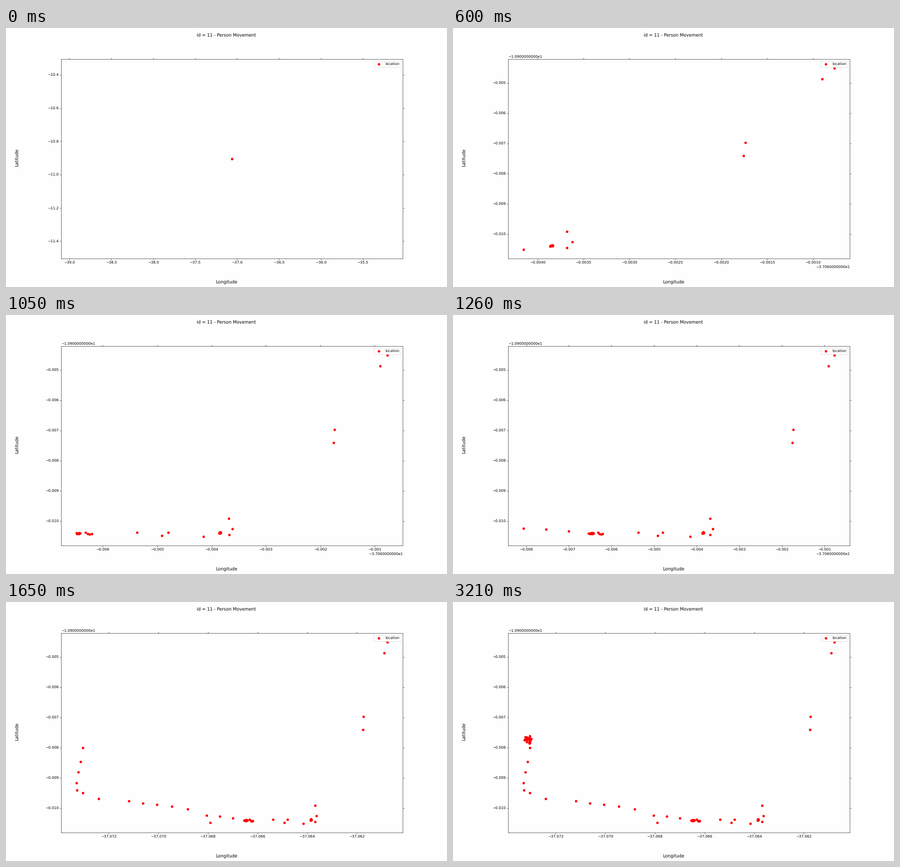
Recreate the animation shown at these times as a matplotlib script. Size 976 px wide and 574 px high, loop 3.24 s.

```python
import math
import random

import matplotlib.pyplot as plt
from matplotlib.animation import FuncAnimation
from matplotlib.ticker import ScalarFormatter

W, H, DPI = 976, 574, 57.4
EPS = 1e-6  # keeps the pixel size from rounding down
LON, LAT = -37.06, -10.9

plt.rcParams.update({
    "font.family": "DejaVu Sans",
    "text.hinting": "none",
    "figure.facecolor": "#fefefe",
    "axes.facecolor": "#fefefe",
    "xtick.top": True,
    "ytick.right": True,
})

rng = random.Random(11)


class LongOffset(ScalarFormatter):
    """Writes the axis offset with ten decimals."""

    def format_data(self, value):
        mantissa, exponent = f"{value:.10e}".split("e")
        return self.fix_minus(f"{mantissa}e{int(exponent)}")


def dwell(x, y, n, dx, dy):
    """n fixes scattered around a resting place."""
    return [(x + rng.uniform(-dx, dx), y + rng.uniform(-dy, dy))
            for _ in range(n)]


def walk(start, end, n, power=1, bow=0):
    """n fixes from start to end, with eased x and bowed y."""
    (x0, y0), (x1, y1) = start, end
    steps = [k / (n - 1) for k in range(n)]
    return [(x0 + (x1 - x0) * t ** power,
             y0 + (y1 - y0) * t + bow * math.sin(math.pi * t))
            for t in steps]


def hold(track, n):
    return [track[-1]] * n


# Microdegrees west and south of (LON, LAT), one fix per step.
# Downhill to the first stop
track = [(768, 4510), (903, 4873), (1737, 6971), (1757, 7407), (3681, 9914)]
track += dwell(3835, 10385, 2, 15, 10)
track += [(3861, 10400)]
track += dwell(3848, 10380, 10, 13, 12)
track += [(3620, 10259), (3680, 10456), (4151, 10507)]

# West to the second stop
track += walk((4798, 10380), (5367, 10380), 3, power=2.25, bow=96)
track += walk((6202, 10422), (6314, 10380), 4, bow=30)
track += dwell(6445, 10405, 7, 30, 20)
track += [(6481, 10395), (6538, 10402)]
track += dwell(6480, 10410, 3, 35, 18)

# Further west, with one stray fix
track += walk((6996, 10334), (8057, 10243), 3, bow=-17)
track += walk((8810, 10037), (10618, 9843), 4, power=0.93, bow=-30)
track += [(11191, 9762), (7908, 10480), (12402, 9688)]

# North to the last stop
track += [(13044, 9490), (13271, 9404), (13291, 9165)]
track += walk((13217, 8810), (13051, 8002), 3, bow=57)
track += dwell(13055, 7830, 13, 9, 40)
track += walk((13044, 7757), (12980, 7703), 3)
track += [(13053, 7690)]
track += hold(track, 5)
track += [(13162, 7810), (13044, 7620), (13226, 7642), (13262, 7753)]
track += dwell(13180, 7700, 14, 50, 42)
track += hold(track, 4)
track += dwell(13189, 7700, 8, 16, 38)

lons = [LON - x * 1e-6 for x, _ in track]
lats = [LAT - y * 1e-6 for _, y in track]

fig, ax = plt.subplots(figsize=((W + EPS) / DPI, (H + EPS) / DPI), dpi=DPI)
fig.suptitle("id = 11 - Person Movement")
fig.supxlabel("Longitude")
fig.supylabel("Latitude")


def draw(i):
    ax.clear()
    for axis in (ax.xaxis, ax.yaxis):
        axis.set_major_formatter(LongOffset())
    ax.scatter(lons[:i + 1], lats[:i + 1], color="red", label="location")
    ax.legend(loc="upper right")


anim = FuncAnimation(fig, draw, frames=len(track), interval=30,
                     repeat=True, repeat_delay=0)
plt.show()
```
